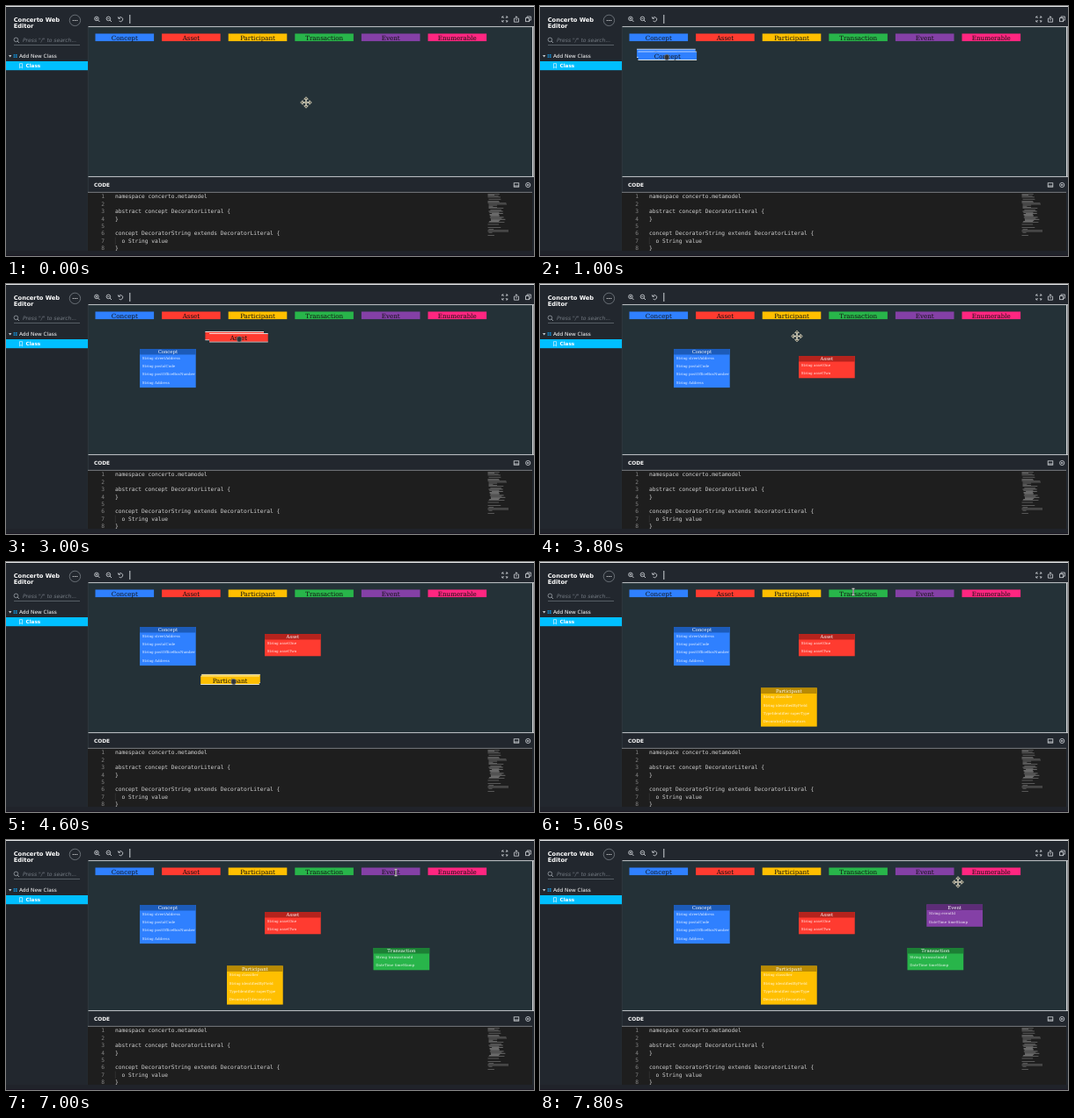
Animation, 600 px wide and 285 px high, one loop 8000 ms. Source, as an HTML page with a canvas:

```html
<!DOCTYPE html>
<html lang="en">
<head>
<meta charset="utf-8">
<title>Concerto Web Editor</title>
<style>
html, body { margin: 0; width: 100%; height: 100%; overflow: hidden; background: #22272e; }
canvas { display: block; width: 600px; height: 285px; }
</style>
</head>
<body>
<canvas id="stage"></canvas>
<script>
const W = 600, H = 285, LOOP = 8000, STEP = 200;
const SANS = '"DejaVu Sans", sans-serif';
const SERIF = '"DejaVu Serif", serif';
const MONO = '"DejaVu Sans Mono", monospace';
const canvas = document.getElementById('stage');
const ctx = canvas.getContext('2d');
const dpr = window.devicePixelRatio || 1;
canvas.width = W * dpr;
canvas.height = H * dpr;

const BTN = { x: 101.5, y: 31.5, gap: 75.6, w: 66.6, h: 8.6 };
const BOX_W = 63.7;

// grab and drop are times; x and y are where the finished box lands
const kinds = [
  { name: 'Concept', color: '#2f80ff', head: '#1c5bb9', x: 152, y: 74, grab: 800, drop: 1400,
    fields: ['String streetAddress', 'String postalCode', 'String postOfficeBoxNumber', 'String Address'] },
  { name: 'Asset', color: '#ff3b30', head: '#b4231d', x: 294, y: 82, grab: 2600, drop: 3600,
    fields: ['String assetOne', 'String assetTwo'] },
  { name: 'Participant', color: '#ffbf00', head: '#b98a04', x: 251, y: 143.5, grab: 4200, drop: 5000,
    fields: ['String classifier', 'String identifiedByField', 'TypeIdentifier superType', 'Decorator[] decorators'] },
  { name: 'Transaction', color: '#28b54a', head: '#1c8035', x: 417.5, y: 123, grab: 6000, drop: 6600,
    fields: ['String transactionId', 'DateTime timeStamp'] },
  { name: 'Event', color: '#8440a6', head: '#5d2c77', x: 439.3, y: 73.5, grab: 7400, drop: 7600,
    fields: ['String eventId', 'DateTime timeStamp'] },
  { name: 'Enumerable', color: '#ff2680' }
];

// pointer path: time, x, y
const path = [
  [0, 341, 110], [600, 134, 37], [800, 136, 42], [1200, 152, 74], [1600, 152, 74],
  [2200, 209, 38], [2400, 211, 37], [2600, 213, 38], [3000, 265, 62.5], [3400, 294, 82],
  [3600, 294, 82], [4000, 290, 37], [4200, 289, 42], [4400, 264, 126], [4600, 258.5, 136],
  [4800, 251, 143], [5000, 251, 143], [5600, 356, 34], [5800, 356, 34], [6000, 362, 44],
  [6400, 417.5, 123], [6600, 417.5, 123], [7000, 443, 37], [7200, 443, 37], [7400, 439, 70],
  [7600, 439, 74], [7800, 475, 48]
];

function pointer(t) {
  const i = path.findIndex(p => p[0] >= t);
  if (i === 0) return { x: path[0][1], y: path[0][2] };
  const [t0, x0, y0] = path[i - 1], [t1, x1, y1] = path[i];
  const k = (t - t0) / (t1 - t0);
  return { x: x0 + (x1 - x0) * k, y: y0 + (y1 - y0) * k };
}

function rect(x, y, w, h, color) {
  ctx.fillStyle = color;
  ctx.fillRect(x, y, w, h);
}

function text(str, x, y, font, color, align = 'left') {
  ctx.font = font;
  ctx.fillStyle = color;
  ctx.textAlign = align;
  ctx.fillText(str, x, y);
}

function line(points, color = '#d5d9dd', width = 0.8) {
  ctx.strokeStyle = color;
  ctx.lineWidth = width;
  ctx.beginPath();
  for (let i = 0; i < points.length; i += 2) ctx.lineTo(points[i], points[i + 1]);
  ctx.stroke();
}

function ring(x, y, r, color = '#d5d9dd', width = 0.8, from = 0, to = Math.PI * 2) {
  ctx.strokeStyle = color;
  ctx.lineWidth = width;
  ctx.beginPath();
  ctx.arc(x, y, r, from, to);
  ctx.stroke();
}

function frameBox(x, y, w, h, color = '#d5d9dd') {
  ctx.strokeStyle = color;
  ctx.lineWidth = 0.8;
  ctx.strokeRect(x, y, w, h);
}

function glass(x, y, sign, color) {
  ring(x - 0.6, y - 0.6, 2.3, color);
  line([x + 1.1, y + 1.1, x + 3, y + 3], color, 0.9);
  if (sign) line([x - 1.8, y - 0.6, x + 0.6, y - 0.6], color, 0.7);
  if (sign === '+') line([x - 0.6, y - 1.8, x - 0.6, y + 0.6], color, 0.7);
}

function sidebar() {
  text('Concerto Web', 8.7, 18, 'bold 6.67px ' + SANS, '#fff');
  text('Editor', 8.7, 24.8, 'bold 6.67px ' + SANS, '#fff');
  ring(78.4, 16.4, 6.2, '#70767d', 0.9);
  for (const dx of [-2.2, 0, 2.2]) rect(78 + dx, 16, 1, 1, '#fff');
  glass(12, 39, '', '#9ba1a8');
  text('Press "/" to search...', 19, 41.2, 'italic 6px ' + SANS, '#747b83');
  line([9, 44.5, 84, 44.5], '#656c74', 0.8);

  ctx.fillStyle = '#c8cdd2';
  ctx.beginPath();
  ctx.moveTo(3, 56);
  ctx.lineTo(6.4, 56);
  ctx.lineTo(4.7, 58.6);
  ctx.fill();
  for (const dx of [0, 2.3]) for (const dy of [0, 2.3]) rect(8.6 + dx, 55 + dy, 1.7, 1.7, '#1687c8');
  text('Add New Class', 15, 59.4, '5.8px ' + SANS, '#fff');
  rect(0, 63, 93, 10.2, '#00bfff');
  line([15.5, 65.6, 15.5, 70.8, 17, 69.4, 18.5, 70.8, 18.5, 65.6, 15.5, 65.6], '#d8f5ff', 0.7);
  text('Class', 22.5, 70.2, 'bold 5.7px ' + SANS, '#fff');
}

function toolbar() {
  glass(103.5, 15, '+');
  glass(117, 15, '-');
  ring(130.2, 15.2, 2.5, '#d5d9dd', 0.8, -2.5, 2.3);
  line([127.4, 12.4, 127.9, 14.4, 130, 14.2]);
  line([140.8, 10, 140.8, 20], '#e4e7ea', 0.9);

  for (const sx of [-1, 1]) for (const sy of [-1, 1]) {
    const x = 566.8, y = 15;
    line([x + sx, y + sy, x + 3 * sx, y + 3 * sy], '#d5d9dd', 0.7);
    line([x + sx * 1.3, y + sy * 3, x + sx * 3, y + sy * 3, x + sx * 3, y + sy * 1.3]);
  }
  line([578.7, 14.2, 577.4, 14.2, 577.4, 18.2, 582.6, 18.2, 582.6, 14.2, 581.3, 14.2]);
  line([580, 16.5, 580, 11.8]);
  line([578.6, 13.2, 580, 11.8, 581.4, 13.2]);
  frameBox(590.6, 13.7, 4, 4);
  line([592, 13.7, 592, 12, 596.4, 12, 596.4, 16.2, 594.6, 16.2]);
}

function minimap() {
  let seed = 7;
  const rnd = () => (seed = seed * 16807 % 2147483647) / 2147483647;
  for (let y = 213; y < 262; y += 1.15) {
    const dense = y > 232 && y < 246;
    const r = rnd();
    if (!dense && r < 0.25) continue;
    const x = 547.5 + (dense ? 5 * rnd() : r < 0.6 ? 1 : 0);
    const w = dense ? 8 + 9 * rnd() : 4 + 20 * rnd() * rnd() + (r > 0.8 ? 8 : 0);
    rect(x, y, Math.min(w, 571 - x), 0.65, dense ? '#929292' : '#777');
  }
}

function codePanel() {
  rect(93, 212.5, 505, 66.8, '#1e1e1e');
  line([93, 212.4, 598, 212.4], '#8c9094', 0.8);
  text('CODE', 100, 206.3, 'bold 5.8px ' + SANS, '#fff');
  frameBox(577.2, 201.8, 5.6, 4.4);
  line([577.2, 205, 582.8, 205]);
  ring(593.2, 204, 2.6);
  line([592.2, 203, 594.2, 205]);
  line([594.2, 203, 592.2, 205]);

  const rows = ['namespace concerto.metamodel', '', 'abstract concept DecoratorLiteral {', '}', '',
    'concept DecoratorString extends DecoratorLiteral {', '  o String value', '}'];
  ctx.save();
  ctx.beginPath();
  ctx.rect(93, 213, 505, 66.3);
  ctx.clip();
  rows.forEach((row, i) => {
    const y = 219.2 + i * 8.45;
    text(i + 1, 112, y, '6.22px ' + MONO, '#858585', 'right');
    text(row, 124, y, '6.22px ' + MONO, '#d4d4d4');
  });
  line([124.3, 263.5, 124.3, 272], '#404040', 0.5);
  minimap();
  ctx.restore();
  rect(0, 279.3, W, 5.7, '#20232a');
  rect(0, 284, W, 1, '#1b1823');
}

function layout() {
  rect(0, 0, W, H, '#22272e');
  rect(0, 0, W, 1, '#e9ebec');
  rect(93.5, 24, 504.5, 170, '#243137');
  line([93.3, 24, 93.3, 279], '#39434a', 0.6);
  line([93.5, 23.6, 600, 23.6], '#d9dcde', 0.9);
  line([93.5, 194.6, 600, 194.6], '#d9dcde', 0.9);
  line([598.8, 24, 598.8, 194.5], '#e8eaeb', 1.4);
  sidebar();
  toolbar();
  codePanel();
}

const buttonMid = i => ({ x: BTN.x + BTN.gap * i + BTN.w / 2, y: BTN.y + BTN.h / 2 });

function button(kind, cx, cy) {
  rect(cx - BTN.w / 2, cy - BTN.h / 2, BTN.w, BTN.h, kind.color);
  text(kind.name, cx, cy + 2.7, '7.11px ' + SERIF, '#101010', 'center');
}

function box({ name, color, head, x, y, fields }) {
  rect(x, y, BOX_W, 6.5 + fields.length * 9.4, color);
  rect(x, y, BOX_W, 6.5, head);
  text(name, x + BOX_W / 2, y + 5, '5.33px ' + SERIF, '#fff', 'center');
  fields.forEach((f, i) => text(f, x + 2.7, y + 11.6 + i * 9.4, '4.1px ' + SERIF, 'rgba(255,255,255,.88)'));
}

function ghost(kind, i, t) {
  const now = pointer(t), before = pointer(t - STEP), held = pointer(kind.grab - STEP), mid = buttonMid(i);
  const cx = now.x + mid.x - held.x, cy = now.y + mid.y - held.y;
  const lag = 0.18, left = -BTN.w / 2, edge = BTN.h / 2 + 0.8;
  const copy = (x, y) => {
    rect(x + left, y - edge, BTN.w, 1, '#fff');
    rect(x + left, y + edge - 1, BTN.w, 1, '#fff');
    button(kind, x, y);
  };
  copy(cx - (now.x - before.x) * lag, cy - (now.y - before.y) * lag);
  copy(cx, cy);
}

function moveCursor(x, y) {
  ctx.save();
  ctx.translate(x, y);
  for (let i = 0; i < 4; i++) {
    ctx.rotate(Math.PI / 2);
    line([0, 1.2, 0, 5], '#ece6cf', 1.4);
    ctx.beginPath();
    ctx.moveTo(-2.3, 3.8);
    ctx.lineTo(0, 6.3);
    ctx.lineTo(2.3, 3.8);
    ctx.closePath();
    ctx.fillStyle = '#3a3a32';
    ctx.fill();
    ctx.strokeStyle = '#ece6cf';
    ctx.lineWidth = 0.8;
    ctx.stroke();
  }
  ctx.restore();
  rect(x - 1.3, y - 1.3, 2.6, 2.6, '#ece6cf');
  rect(x - 0.6, y - 0.6, 1.2, 1.2, '#4a463a');
}

function handCursor(x, y) {
  ctx.beginPath();
  ctx.roundRect(x - 2.4, y - 2.6, 5, 6, 2);
  ctx.fillStyle = '#303338';
  ctx.fill();
  ctx.strokeStyle = '#777b80';
  ctx.lineWidth = 0.7;
  ctx.stroke();
}

function textCursor(x, y) {
  for (const [color, w] of [['#3b3b3b', 1.8], ['#e8e8e8', 0.9]]) {
    line([x, y - 3.5, x, y + 3.5], color, w);
    line([x - 1.5, y - 3.7, x + 1.5, y - 3.7], color, w);
    line([x - 1.5, y + 3.7, x + 1.5, y + 3.7], color, w);
  }
}

function draw(t) {
  ctx.setTransform(dpr, 0, 0, dpr, 0, 0);
  layout();
  kinds.forEach((kind, i) => {
    const mid = buttonMid(i);
    button(kind, mid.x, mid.y);
  });
  kinds.forEach(kind => { if (t >= kind.drop) box(kind); });

  const { x, y } = pointer(t);
  const held = kinds.findIndex(k => t >= k.grab && t < k.drop);
  const overButton = kinds.some((k, i) => {
    const mid = buttonMid(i);
    return Math.abs(x - mid.x) < BTN.w / 2 && Math.abs(y - mid.y) < BTN.h / 2;
  });
  if (held >= 0) {
    ghost(kinds[held], held, t);
    handCursor(x, y);
  } else if (overButton) {
    textCursor(x, y);
  } else {
    moveCursor(x, y);
  }
}

const start = performance.now();
function tick() {
  const t = (performance.now() - start) % LOOP;
  draw(Math.floor(t / STEP) * STEP);
  requestAnimationFrame(tick);
}
tick();
</script>
</body>
</html>
```
